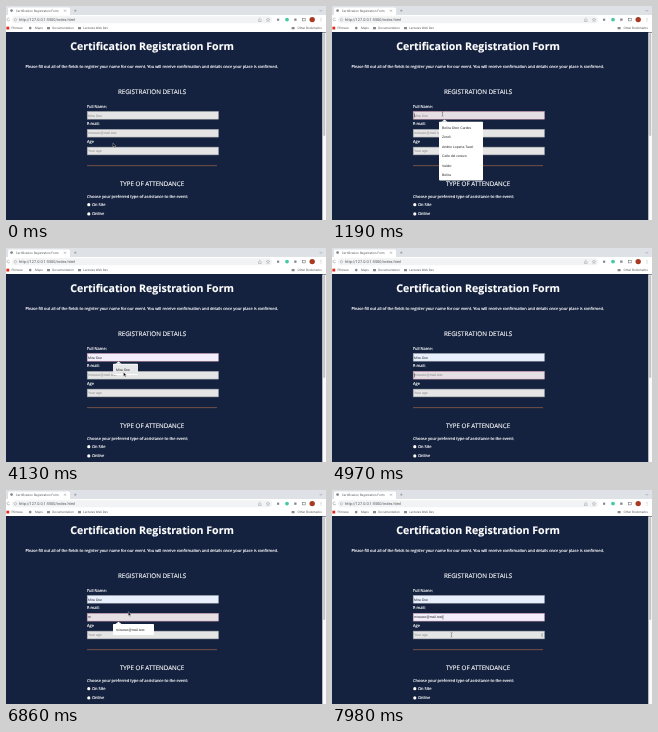
These frames come from a looping animation (320x214 px, 8 s). An HTML page:

```html
<!DOCTYPE html>
<html lang="en">
<head>
<meta charset="utf-8">
<title>Registration form</title>
<style>
html, body { margin: 0; width: 100%; height: 100%; overflow: hidden; background: #14223f; }
svg { display: block; width: 320px; height: 214px; text-rendering: geometricPrecision; }
text { white-space: pre; }
.page { font-family: Tahoma, "Open Sans", "Noto Sans", sans-serif; font-size: 4px; fill: #fff; }
.page text { stroke: #fff; stroke-width: 0.14px; }
.chrome { font-family: Roboto, "Liberation Sans", sans-serif; font-size: 3.15px; fill: #55585c; }
.field { font-family: "Liberation Sans", Arial, sans-serif; font-size: 3.45px; fill: #222; }
.mid { text-anchor: middle; }
</style>
</head>
<body>
<svg id="stage" viewBox="0 0 320 214"></svg>
<script>
const LOOP = 8000, STEP = 70;
const NAME = "Mira Oxe", MAIL = "miraoxe@mail.test";
const GREY = "#85888c";
const stage = document.getElementById("stage");

function add(parent, tag, attrs, content) {
  const el = document.createElementNS("http://www.w3.org/2000/svg", tag);
  for (const key in attrs) el.setAttribute(key, attrs[key]);
  if (content !== undefined) el.textContent = content;
  return parent.appendChild(el);
}
const rect = (p, x, y, width, height, fill, more) => add(p, "rect", { x, y, width, height, fill, ...more });
const dot = (p, cx, cy, r, fill) => add(p, "circle", { cx, cy, r, fill });
const label = (p, x, y, content, more) => add(p, "text", { x, y, ...more }, content);
const line = (p, d, stroke, width = 0.5) =>
  add(p, "path", { d, stroke, "stroke-width": width, fill: "none" });
const group = cls => add(stage, "g", { class: cls });
const show = (el, on) => el.setAttribute("visibility", on ? "visible" : "hidden");

function drawBrowser() {
  const g = group("chrome");
  rect(g, 0, 0, 320, 9, "#dee1e6");
  rect(g, 2, 1.5, 62, 9, "#fff", { rx: 1.5 });
  rect(g, 0, 9, 320, 17, "#fff");
  dot(g, 5.6, 4.6, 1.4, GREY);
  label(g, 9.8, 5.6, "Certification Registration Form");
  line(g, "M58 3.7l2 2m0 -2l-2 2M68 4.7h2.6m-1.3 -1.3v2.6M313.6 4l1.3 1.3l1.3 -1.3", GREY);

  rect(g, 6, 10.2, 260, 7, "#f1f3f4", { rx: 3.5 });
  line(g, "M3.4 12.6a1.4 1.4 0 1 0 .3 1.4", GREY);
  line(g, "M8.2 13.7a1.2 1.2 0 1 0 2.4 0a1.2 1.2 0 1 0 -2.4 0", GREY, 0.4);
  label(g, 13, 14.9, "http://127.0.0.1:5500/index.html", { "font-size": 3.9 });
  line(g, "M252.5 13.3v2.2h2.6v-2.2M253.8 14.4v-2.8", GREY, 0.4);
  line(g, "M262 12l.5 1.2l1.3 .1l-1 .9l.3 1.3l-1.1 -.7l-1.1 .7l.3 -1.3l-1 -.9l1.3 -.1z", GREY, 0.35);
  rect(g, 271, 12.6, 2.2, 2.2, GREY);
  dot(g, 281, 13.6, 1.9, "#45c9a5");
  rect(g, 288.2, 12.5, 2.3, 2.3, GREY);
  rect(g, 296.6, 12.3, 2.6, 2.6, "none", { stroke: "#5f6368", "stroke-width": 0.5 });
  dot(g, 306.2, 13.6, 2.7, "#a83a22");
  for (const y of [12.2, 13.6, 15]) dot(g, 315, y, 0.4, GREY);

  rect(g, 0.4, 20.7, 2.8, 2.8, "#e8261c");
  label(g, 5.6, 23.2, "Plimvee");
  dot(g, 24.2, 22.1, 1.3, GREY);
  label(g, 29, 23.2, "Maps");
  for (const x of [41, 72, 285.6]) rect(g, x, 20.9, 3, 2.3, GREY, { rx: 0.3 });
  label(g, 46.3, 23.2, "Documentation");
  label(g, 77, 23.2, "Lectures Web Dev");
  label(g, 291.5, 23.2, "Other Bookmarks");
}

function drawPage() {
  const g = group("page");
  rect(g, 0, 26.5, 316.3, 188, "#14223f");
  rect(g, 316.3, 26.5, 3.7, 188, "#fafafa");
  rect(g, 317.2, 27, 2, 103, "#c4c4c4", { rx: 1 });
  label(g, 146, 44.4, "Certification Registration Form", { class: "mid", "font-size": 10.58, "font-weight": 700 });
  label(g, 145.7, 61.5, "Please fill out all of the fields to register your name for our event. " +
    "You will receive confirmation and details once your place is confirmed.", { class: "mid" });
  label(g, 146, 87.7, "REGISTRATION DETAILS", { class: "mid", "font-size": 6.3 });
  label(g, 81, 101.7, "Full Name:");
  label(g, 81, 119.4, "E-mail:");
  label(g, 81, 137.3, "Age");
  rect(g, 81, 159.3, 130, 0.8, "#8c5b45");
  label(g, 146, 180.4, "TYPE OF ATTENDANCE", { class: "mid", "font-size": 6.2 });
  label(g, 81, 192, "Choose your preferred type of assistance to the event:");
  ["On Site", "Online"].forEach((name, i) => {
    dot(g, 82.8, 198.7 + 9.2 * i, 1.6, "#fff");
    label(g, 86, 200 + 9.2 * i, name);
  });
}

function makeField(y, hint) {
  const g = group("field");
  const box = rect(g, 81.2, y + 0.3, 131.3, 7.8, "#e5e5e5", { "stroke-width": 0.5 });
  const text = label(g, 82, y + 5.4, hint);
  const caret = rect(g, 0, y + 2.2, 0.5, 4.2, "#333");
  return ({ value = "", focus = false, filled = false, blink = false }) => {
    box.setAttribute("fill", filled ? (focus ? "#f2eefb" : "#e8f0fe") : focus ? "#e5dfe3" : "#e5e5e5");
    box.setAttribute("stroke", focus ? "#c58fa3" : "#9a9da4");
    text.textContent = value || hint;
    text.setAttribute("fill", value ? "#222" : "#858585");
    caret.setAttribute("x", 82 + (value ? text.getComputedTextLength() + 0.2 : 0));
    show(caret, focus && blink);
  };
}

function makePopup(y, width, rows) {
  const g = group("field");
  const height = 9.5 * rows.length + 1.6;
  add(g, "path", { d: `M109.5 ${y}l3 -2.2l3 2.2z`, fill: "#fff" });
  rect(g, 107, y, width, height, "#fff", { rx: 0.8 });
  const hover = rect(g, 107, y + 0.8, width, 9.5, "#e6e7e9");
  rows.forEach((row, i) => label(g, 110, y + 7 + 9.5 * i, row));
  return (on, hovered = false) => {
    show(g, on);
    show(hover, on && hovered);
  };
}

drawBrowser();
drawPage();
const nameField = makeField(105.1, NAME);
const mailField = makeField(123, MAIL);
const ageField = makeField(140.8, "Your age");
const spinner = add(stage, "path", { d: "M209 144.5l1 -1.4l1 1.4zM209 145.6l1 1.4l1 -1.4z", fill: "#888" });
const history = makePopup(115.8, 44,
  ["Belira Oton Cardes", "Zoreli", "Andrio Lopena Tavel", "Calle del cerezo", "Valdor", "Belira"]);
const nameMatch = makePopup(115.8, 25, [NAME]);
const mailMatch = makePopup(134, 41, [MAIL]);

const arrow = add(stage, "path", {
  d: "M0 0v4l.95 -.85l.65 1.5l.75 -.3l-.65 -1.5h1.3z", fill: "#000", stroke: "#fff", "stroke-width": 0.35
});
const beam = line(stage, "M-.9 -2.2q.9 0 .9 .6q0 -.6 .9 -.6M0 -1.8v3.6M-.9 2.2q.9 0 .9 -.6q0 .6 .9 .6", "#555", 0.45);

// Pointer stops: time, x, y
const path = [
  [0, 106.9, 137.2], [210, 106.9, 137.2], [980, 110.5, 108], [3430, 110.5, 108],
  [4060, 117.5, 124.3], [6650, 117.5, 124.3], [6860, 122.3, 121.8],
  [7280, 123.5, 138.5], [7560, 123.5, 138.5], [7910, 119.5, 144.8], [8000, 119.5, 144.8]
];
function pointerAt(t) {
  const i = path.findIndex(stop => stop[0] > t);
  const [t0, x0, y0] = path[i - 1], [t1, x1, y1] = path[i];
  const u = (t - t0) / (t1 - t0), e = u * u * (3 - 2 * u);
  return [x0 + (x1 - x0) * e, y0 + (y1 - y0) * e];
}

function draw(t) {
  const within = (a, b) => t >= a && t < b;
  const blink = since => (t - since) % 1000 < 500;
  const [x, y] = pointerAt(t);

  const nameOpen = within(2170, 4480), mailOpen = within(5950, 7490);
  const pointing = within(0, 2170) || within(3500, 4620) || t >= 6720;
  const nameHover = nameOpen && pointing && y > 116;
  const mailHover = mailOpen && pointing && y > 134;
  const nameDone = t >= 4480 || nameHover;
  const mailDone = t >= 7490 || mailHover;

  nameField({
    value: nameDone ? NAME : t >= 2170 ? NAME[0] : "",
    focus: within(1050, 4690), filled: nameDone, blink: blink(t < 2170 ? 1050 : 2170)
  });
  mailField({
    value: mailDone ? MAIL : t >= 5950 ? MAIL[0] : "",
    focus: t >= 4690, filled: mailDone, blink: blink(t < 5950 ? 4820 : t < 7490 ? 5950 : 7490)
  });
  ageField({});
  history(within(1120, 2170));
  nameMatch(nameOpen, nameHover);
  mailMatch(mailOpen, mailHover);

  const overField = [105, 123, 140.8].some(top => y >= top && y <= top + 8.4);
  const asBeam = overField && !nameHover && !mailHover;
  show(arrow, pointing && !asBeam);
  show(beam, pointing && asBeam);
  show(spinner, pointing && asBeam && y > 140.8);
  for (const el of [arrow, beam]) el.setAttribute("transform", `translate(${x} ${y})`);
}

const start = performance.now();
function tick() {
  const t = (performance.now() - start) % LOOP;
  draw(Math.floor(t / STEP) * STEP);
  requestAnimationFrame(tick);
}
tick();
</script>
</body>
</html>
```
